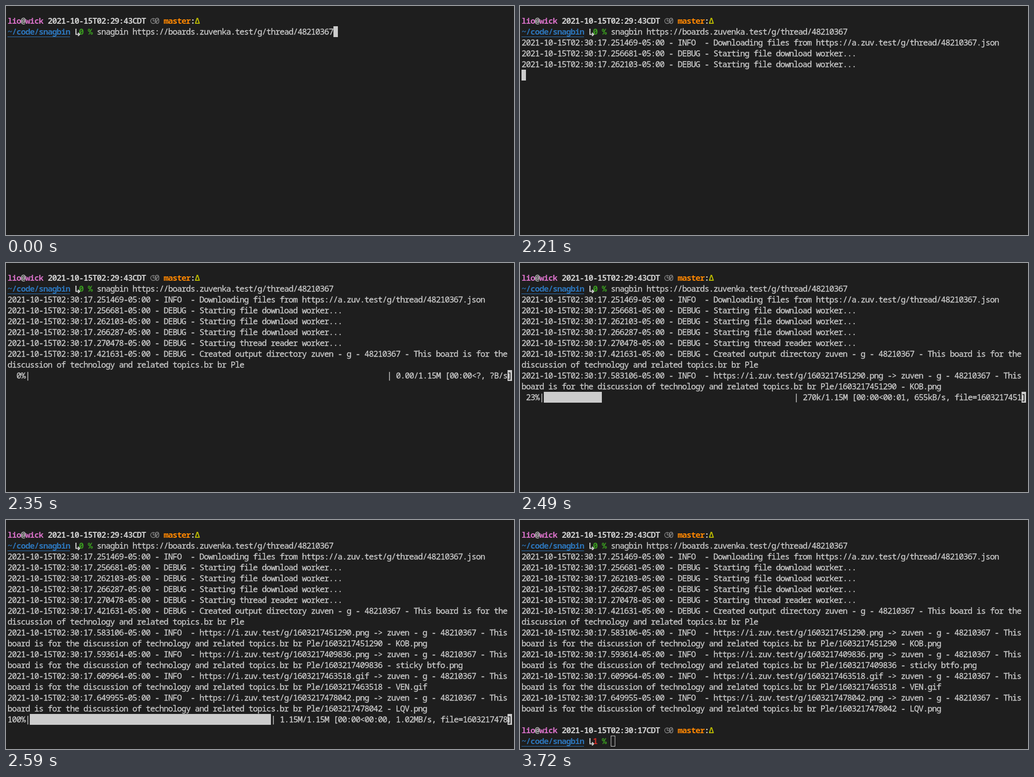
Recreate the animation shown at these times as an HTML page. Size 1024 by 464 pixels, loop 5.72 s.

```html
<!DOCTYPE html>
<html lang="en">
<head>
<meta charset="utf-8">
<title>Terminal session</title>
<style>
  html, body { margin: 0; width: 100%; height: 100%; overflow: hidden; background: #1e1e1e; }
  #term {
    position: absolute; left: 3px; top: 19px; width: 1017px; height: 440px;
    color: #ccc; white-space: pre;
    /* 10px advance tightened to a 9px cell */
    font: calc(50px / 3)/22px "Noto Sans Mono", "DejaVu Sans Mono", monospace;
    letter-spacing: -1px; font-variant-ligatures: none;
    -webkit-text-stroke: 0.3px currentColor;
  }
  #log, #bars, #cursor { position: absolute; left: 0; top: 0; animation: 5720ms step-end infinite; }
  #log { width: 1021px; overflow: hidden; animation-name: log; }
  #cursor {
    width: 9px; height: 22px; background: #ccc; box-shadow: inset 0 0 0 1px #ccc;
    animation-name: cursor;
  }
  #bars { width: 1021px; height: 22px; overflow: hidden; animation-name: bars; }
  #strip { animation: strip 5720ms step-end infinite; }
  .bar { height: 22px; }
  .fill {
    display: inline-block; height: 22px; vertical-align: top; width: calc(var(--of) * 9px);
    background: linear-gradient(#ccc, #ccc) 0 0 / calc(var(--n) * 9px) 100% no-repeat;
  }
  .under { color: #1e1e1e; }

  b { font-weight: 700; -webkit-text-stroke-width: 0; }
  .user { color: #d670c6; }
  .branch { color: #ff8700; }
  .dirty { color: #b9b900; }
  .jobs { color: #808080; }
  .ok { color: #3a9a20; }
  .fail { color: #cd2a24; }
  .path {
    display: inline-block; height: 22px; vertical-align: top;
    color: #2c74b8; box-shadow: inset 0 -1px #2c74b8;
  }
  svg { width: 9px; height: 22px; vertical-align: top; overflow: visible; fill: none; }

  @keyframes log {
    0% { height: 44px }
    37.762% { height: 66px }
    38.636% { height: 110px }
    38.986% { height: 132px }
    39.335% { height: 154px }
    41.083% { height: 198px }
    43.531% { height: 242px }
    44.405% { height: 330px }
    45.279% { height: 374px }
    46.153%, 100% { height: 440px }
  }
  @keyframes cursor {
    0% { transform: translate(657px, 22px) }
    34.965% { transform: translate(0, 44px) }
    37.762% { transform: translate(0, 66px) }
    38.636% { transform: translate(0, 110px) }
    38.986% { transform: translate(0, 132px) }
    39.335% { transform: translate(0, 154px) }
    41.083% { transform: translate(1008px, 198px) }
    43.531% { transform: translate(1008px, 242px) }
    44.405% { transform: translate(1008px, 330px) }
    45.279% { transform: translate(1008px, 374px) }
    46.153% { transform: translate(180px, 418px); background: #ccc }
    65.034%, 100% { transform: translate(180px, 418px); background: transparent }
  }
  @keyframes bars {
    0% { visibility: hidden }
    41.083% { visibility: visible; top: 198px }
    43.531% { visibility: visible; top: 242px }
    44.405% { visibility: visible; top: 330px }
    45.279% { visibility: visible; top: 374px }
    46.153%, 100% { visibility: hidden }
  }
  @keyframes strip {
    0% { transform: none }
    43.531% { transform: translateY(-22px) }
    44.405% { transform: translateY(-44px) }
    45.279%, 100% { transform: translateY(-66px) }
  }
</style>
</head>
<body>
<div id="term"><div id="log"></div><div id="cursor"></div><div id="bars"><div id="strip"></div></div></div>
<script>
  const THREAD = '48210367';
  const FOLDER = `zuven - g - ${THREAD} - This`;
  const TOPIC = 'discussion of technology and related topics.br br Ple';

  const clock = '<svg stroke="#8a8a8a" stroke-width="1.3"><circle cx="5.8" cy="11.3" r="5.2"/><path d="M5.8 6v5.3h5.2"/></svg>';
  const hook = '<svg stroke="#ccc" stroke-width="2.2"><path d="M3 5v11.5h7M7.2 13.2l3.3 3.3-3.3 3.3"/></svg>';

  const prompt = (time, status, cls) =>
    `<b class="user">lio</b>@<b class="user">wick</b> <b>2021-10-15T${time}CDT</b> ` +
    `${clock}<span class="jobs">0</span> <b class="branch">master</b><b>:</b><b class="dirty">Δ</b>\n` +
    `<b class="path">~/code/snagbin</b> ${hook}<b class="${cls}">${status}</b> <b class="ok">%</b> `;

  const entry = (micros, level, text) =>
    `2021-10-15T02:30:17.${micros}-05:00 - ${level.padEnd(5)} - ${text}`;

  const saved = (micros, id, name, ext) =>
    entry(micros, 'INFO', `https://i.zuv.test/g/${id}.${ext} -&gt; ${FOLDER}\n`) +
    `board is for the ${TOPIC}/${id} - ${name}.${ext}`;

  const bar = (percent, n, of, stats) =>
    `<div class="bar">${String(percent).padStart(3)}%|` +
    `<span class="fill" style="--n:${n};--of:${of}"></span>| ${stats}<span class="under">]</span></div>`;

  document.getElementById('log').innerHTML = [
    prompt('02:29:43', 0, 'ok') + `snagbin https://boards.zuvenka.test/g/thread/${THREAD}`,
    entry('251469', 'INFO', `Downloading files from https://a.zuv.test/g/thread/${THREAD}.json`),
    entry('256681', 'DEBUG', 'Starting file download worker...'),
    entry('262103', 'DEBUG', 'Starting file download worker...'),
    entry('266287', 'DEBUG', 'Starting file download worker...'),
    entry('270478', 'DEBUG', 'Starting thread reader worker...'),
    entry('421631', 'DEBUG', `Created output directory ${FOLDER} board is for the\n${TOPIC}`),
    saved('583106', '1603217451290', 'KOB', 'png'),
    saved('593614', '1603217409836', 'sticky btfo', 'png'),
    saved('609964', '1603217463518', 'VEN', 'gif'),
    saved('649955', '1603217478042', 'LQV', 'png'),
    '',
    prompt('02:30:17', 1, 'fail')
  ].join('\n');

  document.getElementById('strip').innerHTML =
    bar(0, 0, 80, '0.00/1.15M [00:00&lt;?, ?B/s') +
    bar(23, 13, 56, '270k/1.15M [00:00&lt;00:01, 655kB/s, file=1603217451') +
    bar(75, 42, 56, '881k/1.15M [00:00&lt;00:00, 701kB/s, file=1603217409') +
    bar(100, 54, 54, '1.15M/1.15M [00:00&lt;00:00, 1.02MB/s, file=1603217478');
</script>
</body>
</html>
```
